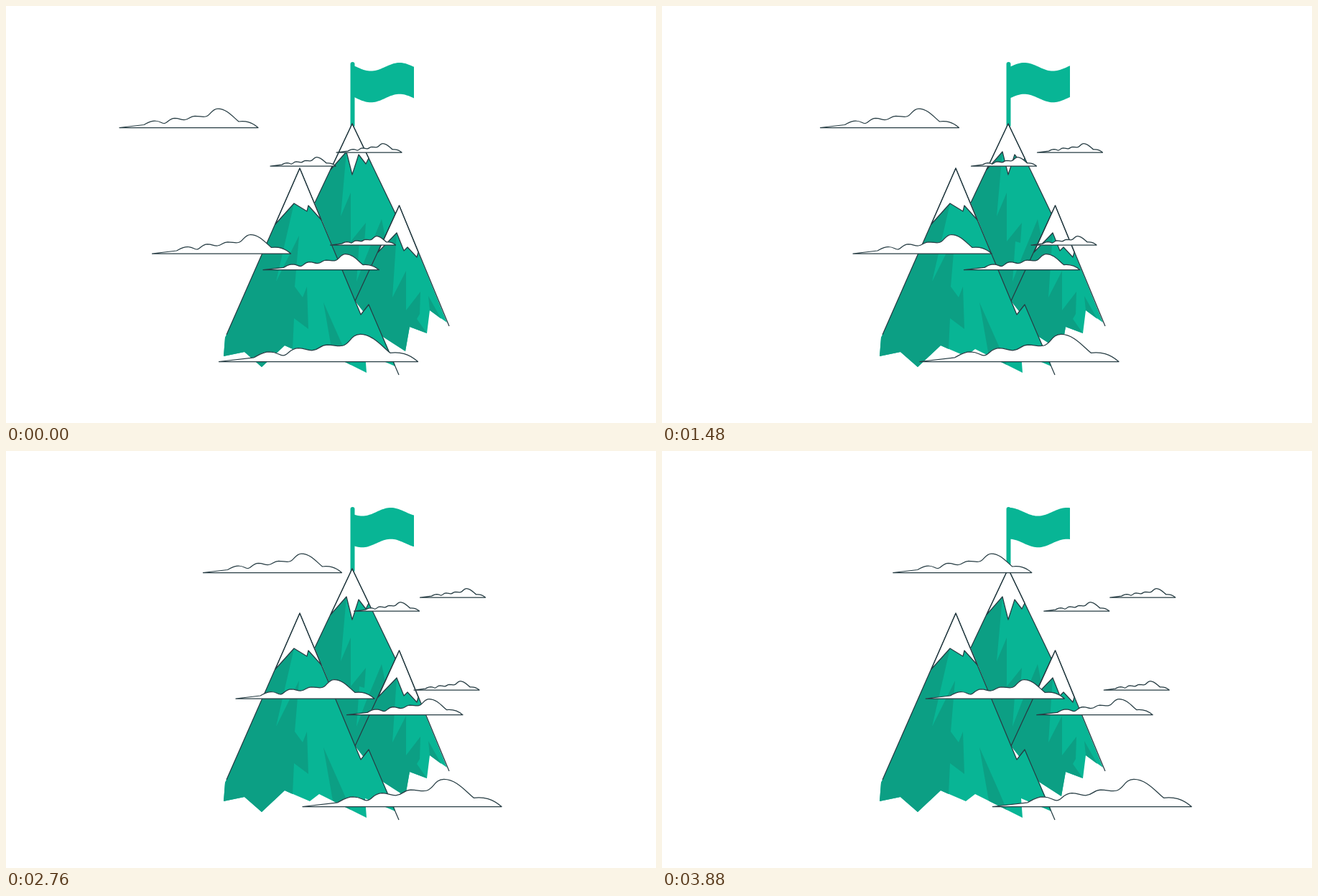
An HTML page for the animation above (3920 ms loop, 905 px wide and 581 px high).

```html
<!DOCTYPE html>
<html lang="en">
<head>
<meta charset="utf-8">
<title>Mountains</title>
<style>
  html, body { margin: 0; width: 100%; height: 100%; overflow: hidden; background: #fff; }
  svg { display: block; }
  .light { fill: #08b595; }
  .dark { fill: #0c9f84; }
  .snow { fill: #fff; }
  .line { fill: none; }
  .snow, .line, .cloud { stroke: #263c43; stroke-width: 1.25; stroke-linejoin: round; }
  .cloud { fill: #fff; vector-effect: non-scaling-stroke; }
</style>
</head>
<body>
<svg width="905" height="581" viewBox="0 0 905 581">
  <defs>
    <path id="cloud" class="cloud" d="M0 0L34-4C38-6 42-9.5 49-9.5C57-9.3 58-6.2 62-6C67-5.5 68-13 77-13.2C84-13.2 85-10.6 91-11C97-11.5 98-16 105-16.2C112-16.2 115-14.5 120-15.5C127-17 128-26.5 137-26.5C149-26.5 158-15 166-8.5C176-9.5 184-8 193 0Z"/>
  </defs>

  <path d="M482.5 81V166" stroke="#08b595" stroke-width="6" stroke-linecap="round"/>
  <path id="flag" class="light"/>

  <g id="back">
    <path class="light" d="M430 274L452 228L474 203L482 235L491 207L501 220L505 212L543 291L486 411Z"/>
    <path class="dark" d="M430 274L452 228L474 203L466 293L480 260V328L501 302L499 330L492 328L488 384L501 350L523 297L528 322L486 411Z"/>
    <path class="snow" d="M482 164L452 228L474 203L482 235L491 207L501 220L505 212Z"/>
    <path class="line" d="M430 274L482 164L543 291"/>
  </g>

  <g id="right">
    <path class="light" d="M486 411L518 343L544 316L554 341L559 336L572 350L574 343L614 441L590 424L586 456L562 447L556 481L525 461Z"/>
    <path class="dark" d="M486 411L518 343L544 316L538 406L557 369V424L577 398L576 429L572 436L586 456L562 447L556 481L525 461ZM588 404L606 436L590 424Z"/>
    <path class="snow" d="M547.5 278L518 343L544 316L554 341L559 336L572 350L574 343Z"/>
    <path class="line" d="M486 411L547.5 278L617 446"/>
  </g>

  <g id="left">
    <path class="light" d="M307 458L375 304L401 275L419 286L421 278L439 298L494 430L505 416L541 498L542 502L500 484L502 511L436 478L423 488L388 473L356 503L332 482L303 488L305 462Z"/>
    <path class="dark" d="M307 458L375 304L401 275L376 384L408 320L402 391L413 406L419 391L421 450L401 435L399 478L388 473L356 503L332 482L303 488L305 462ZM442 413L455 487.500L480 500L469 474Z"/>
    <path class="snow" d="M409 226L375 304L401 275L419 286L421 278L439 298Z"/>
    <path class="line" d="M307 458L409 226L494 430L505 416L547 514"/>
  </g>

  <g id="clouds"></g>
</svg>
<script>
  const LOOP = 3920, STEP = 40;
  const CLOUD_SPEED = 0.0422, WAVE_SPEED = 0.0246, WAVELENGTH = 80;
  const flag = document.getElementById('flag');
  const clouds = document.getElementById('clouds');

  // x, baseline, width
  clouds.innerHTML = [
    [158, 169.5, 193], [460, 204, 91], [368, 223, 91], [203.5, 345, 193],
    [451.5, 333, 91], [358, 367.700, 161.500], [296.5, 495.5, 277]
  ].map(([x, y, w]) =>
    `<use href="#cloud" transform="translate(${x} ${y}) scale(${w / 193})"/>`).join('');

  function flagPath(t) {
    const trough = 508 + t * WAVE_SPEED;
    const top = [], bottom = [];
    for (let x = 482; x <= 568; x += 2) {
      const y = 84.8 + 5.8 * Math.cos((x - trough) / WAVELENGTH * 2 * Math.PI);
      top.push(`${x} ${y}`);
      bottom.unshift(`${x} ${y + 43.7}`);
    }
    return `M${top.concat(bottom).join('L')}Z`;
  }

  function draw(now) {
    const t = Math.floor(now % LOOP / STEP) * STEP;
    clouds.setAttribute('transform', `translate(${t * CLOUD_SPEED} 0)`);
    flag.setAttribute('d', flagPath(t));
  }

  const start = performance.now();
  function tick() {
    draw(performance.now() - start);
    requestAnimationFrame(tick);
  }
  tick();
</script>
</body>
</html>
```
